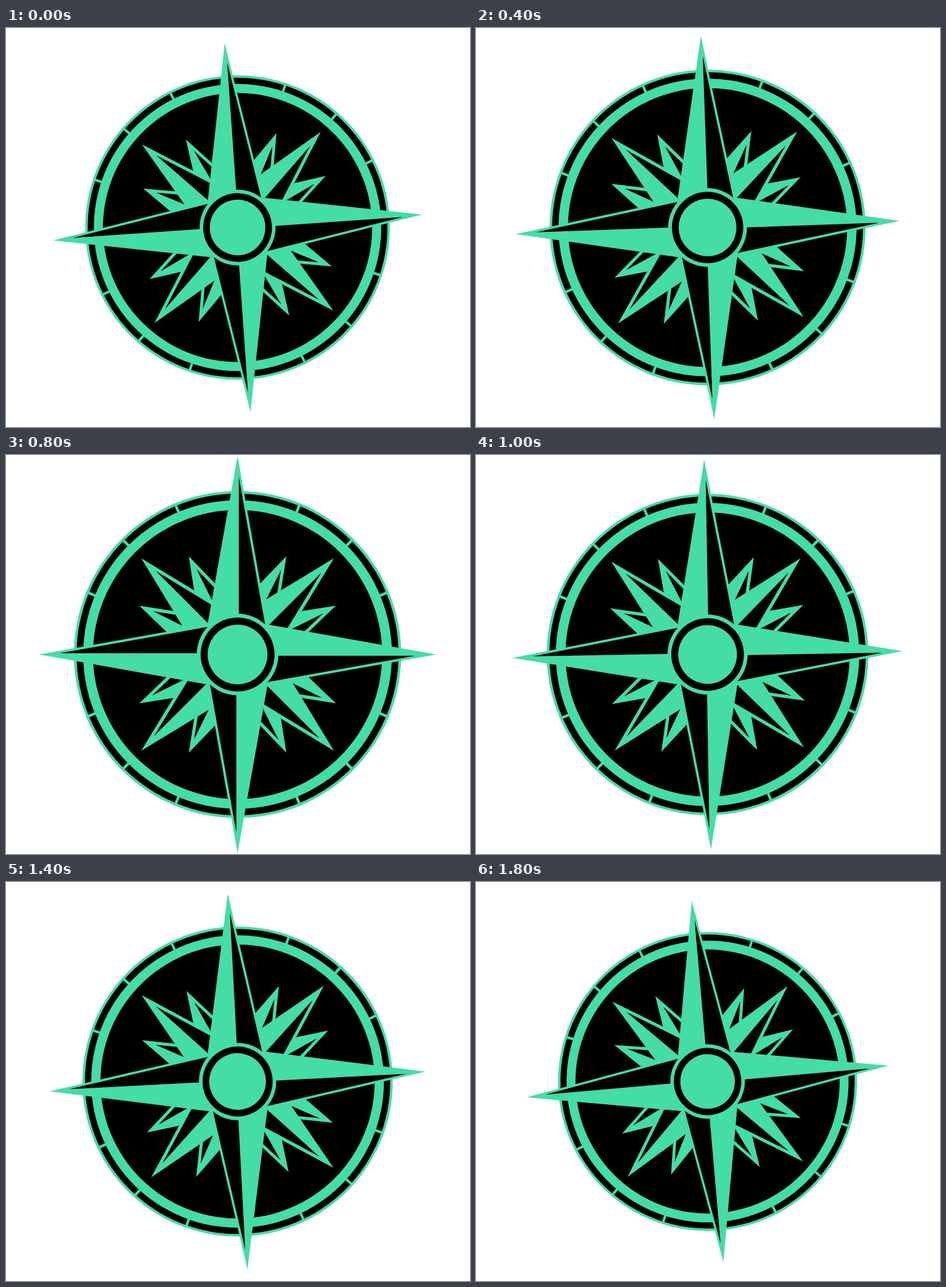
Animation, 753 px wide and 648 px high, one loop 2 s. Source, as an HTML page with a canvas:

```html
<!DOCTYPE html>
<html lang="en">
<head>
<meta charset="utf-8">
<title>Compass</title>
<style>
  html, body { margin: 0; width: 100%; height: 100%; overflow: hidden; background: #fff; }
  canvas { display: block; }
</style>
</head>
<body>
<canvas id="stage" width="753" height="648"></canvas>
<script>
const ctx = document.getElementById("stage").getContext("2d");
const GREEN = "#44dda4";
const BLACK = "#000";
const STEP_MS = 200;
const STEPS = 10;
const BASE = 46;        // distance from the centre to a spike's foot, hidden by the hub
const SHADE_SHIFT = 2;  // gap between a spike's axis and its black half

// slope: half-width gained per pixel from the tip; rim: green left beside the black half
const cardinal = { length: 322.5, slope: 0.178, rim: 4 };
const diagonal = { length: 221, slope: 0.244, rim: 5.5 };
const minor = { length: 178, slope: 0.315, rim: 5.5 };
const MINOR_ANGLE = 26.4;

const radians = degrees => degrees * Math.PI / 180;

function polygon(points, color) {
  ctx.beginPath();
  points.forEach(([x, y]) => ctx.lineTo(x, y));
  ctx.closePath();
  ctx.fillStyle = color;
  ctx.fill();
}

function disc(radius, color) {
  ctx.beginPath();
  ctx.arc(0, 0, radius, 0, 2 * Math.PI);
  ctx.fillStyle = color;
  ctx.fill();
}

function turned(degrees, draw) {
  ctx.save();
  ctx.rotate(radians(degrees));
  draw();
  ctx.restore();
}

function repeatAround(count, draw, offset = 0) {
  for (let i = 0; i < count; i++) turned(offset + i * 360 / count, draw);
}

// A pointed spike whose clockwise half is black.
function spike({ length, slope, rim }) {
  const half = slope * (length - BASE);
  const apex = length - (SHADE_SHIFT + rim) / slope;
  polygon([[0, -length], [half, -BASE], [0, 0], [-half, -BASE]], GREEN);
  polygon([[SHADE_SHIFT, -apex], [half - rim, -BASE], [SHADE_SHIFT, -BASE]], BLACK);
}

function drawCompass() {
  disc(265.6, GREEN);
  disc(261.3, BLACK);
  ctx.fillStyle = GREEN;
  repeatAround(16, () => ctx.fillRect(-2.2, -264, 4.4, 16));
  disc(250.5, GREEN);
  disc(234.7, BLACK);

  repeatAround(4, () => spike(minor), MINOR_ANGLE);
  repeatAround(4, () => spike(minor), -MINOR_ANGLE);
  repeatAround(4, () => spike(diagonal), 45);
  repeatAround(4, () => spike(cardinal));

  disc(66.2, GREEN);
  disc(60, BLACK);
  disc(48.5, GREEN);
}

function frame(now) {
  // The rose stands upright at step 4 and leans furthest left at step 9.
  const step = Math.floor(now / STEP_MS) % STEPS;
  const swing = Math.abs(step - 4);
  const scale = 1 - 0.0173 * swing;
  ctx.setTransform(1, 0, 0, 1, 0, 0);
  ctx.fillStyle = "#fff";
  ctx.fillRect(0, 0, 753, 648);
  ctx.translate(375.8, 324);
  ctx.rotate(radians(-swing));
  ctx.scale(scale, scale);
  drawCompass();
  requestAnimationFrame(frame);
}

frame(0);
</script>
</body>
</html>
```
